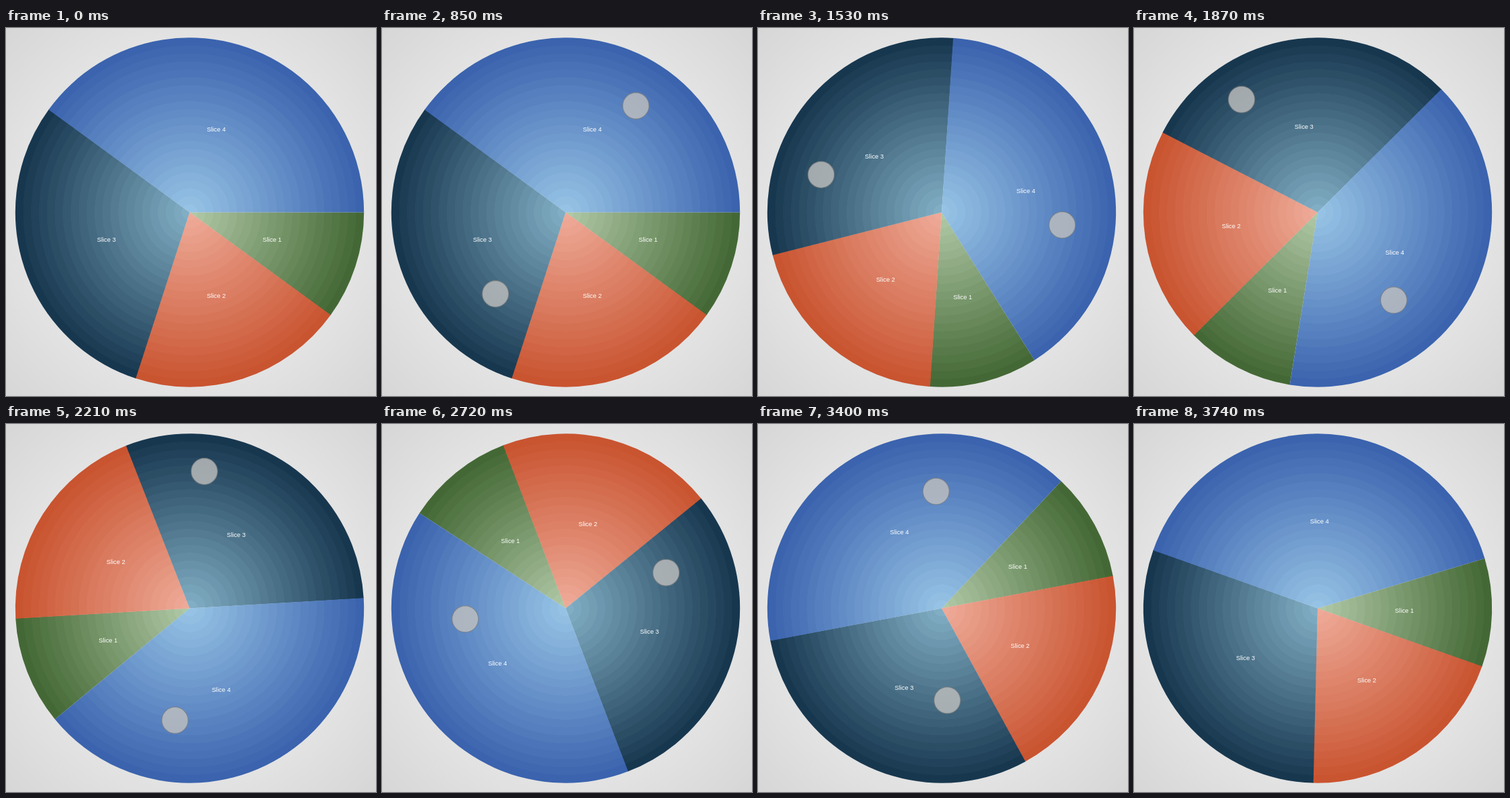
Animation, 548 px wide and 544 px high, one loop 6910 ms. Source, as an HTML page with a canvas:

```html
<!DOCTYPE html>
<html lang="en">
<head>
<meta charset="utf-8">
<title>Rotating pie</title>
<style>
  html, body { margin: 0; width: 100%; height: 100%; overflow: hidden; background: #dcdcdc; }
  canvas { display: block; }
</style>
</head>
<body>
<canvas id="stage" width="548" height="544"></canvas>
<script>
const ctx = document.getElementById('stage').getContext('2d');
const W = 548, H = 544;
const LOOP = 6910, START = 850, STEP = 170, LAST = 17;
const CX = 272, CY = 272.5, R = 258.2;
const BANDS = 22;
const rad = deg => deg * Math.PI / 180;
const mix = (a, b, f) => a + (b - a) * f;

const slices = [
  { share: 0.1, centre: [178, 202, 168], rim: [65, 102, 50] },
  { share: 0.2, centre: [239, 172, 154], rim: [200, 82, 46] },
  { share: 0.3, centre: [132, 177, 199], rim: [20, 52, 76] },
  { share: 0.4, centre: [152, 197, 230], rim: [57, 97, 173] }
];

// Turn of the pie in degrees: [step, angle], straight in between
const turnKeys = [[0, 0], [1, 3], [4, 57.8], [8, 140.6], [11, 213], [13, 256.6], [16, 341.6], [17, 343.4]];

function pieTurn(step) {
  const i = turnKeys.findIndex(key => key[0] >= step);
  if (i <= 0) return 0;
  const [s0, a] = turnKeys[i - 1], [s1, b] = turnKeys[i];
  return mix(a, b, (step - s0) / (s1 - s0));
}

// The two fingers speed up round the middle, spread slowly, then pinch in
const fingerAngle = step => rad(-53.2 + 12.2 * step ** 1.2065);
const fingerReach = step => 173.6 + 2.2 * step - 52 / (1 + Math.exp((9.56 - step) / 0.763));

// Concentric rings of flat colour
function ringFill({ centre, rim }) {
  const g = ctx.createRadialGradient(CX, CY, 0, CX, CY, R);
  for (let i = 0; i < BANDS; i++) {
    const rgb = centre.map((c, k) => Math.round(mix(c, rim[k], (i + 0.5) / BANDS)));
    g.addColorStop(i / BANDS, `rgb(${rgb})`);
    g.addColorStop((i + 1) / BANDS, `rgb(${rgb})`);
  }
  return g;
}

slices.forEach(s => { s.fill = ringFill(s); });
const backdrop = ctx.createRadialGradient(CX, CY, 255, CX, CY, 386);
backdrop.addColorStop(0, '#e3e3e3');
backdrop.addColorStop(1, '#d6d6d6');

function drawPie(turn) {
  let a = turn;
  slices.forEach((s, i) => {
    const end = a + s.share * 360;
    s.mid = rad((a + end) / 2);
    ctx.beginPath();
    ctx.moveTo(CX, CY);
    // A slight overlap hides the seam; the last slice must not cover the first
    ctx.arc(CX, CY, R, rad(a), rad(end + (i < 3 ? 0.15 : 0)));
    ctx.closePath();
    ctx.fillStyle = s.fill;
    ctx.fill();
    a = end;
  });
  ctx.font = '9.3px "Liberation Sans", Arial, sans-serif';
  ctx.textAlign = 'center';
  ctx.fillStyle = '#fff';
  slices.forEach((s, i) => {
    const x = CX + R / 2 * Math.cos(s.mid), y = CY + R / 2 * Math.sin(s.mid);
    ctx.fillText('Slice ' + (i + 1), x - 0.5, y + 3.6);
  });
}

function drawTouch(x, y) {
  ctx.beginPath();
  ctx.arc(x, y, 19.5, 0, Math.PI * 2);
  ctx.fillStyle = 'rgba(193,193,192,0.8)';
  ctx.fill();
  ctx.lineWidth = 1.3;
  ctx.strokeStyle = 'rgba(120,122,124,0.65)';
  ctx.stroke();
}

function draw(t) {
  const step = Math.min(LAST, Math.floor((t - START) / STEP));
  ctx.fillStyle = backdrop;
  ctx.fillRect(0, 0, W, H);
  drawPie(pieTurn(step));
  if (step >= 0 && step < LAST) {
    const a = fingerAngle(step), reach = fingerReach(step);
    const dx = reach * Math.cos(a), dy = reach * Math.sin(a);
    drawTouch(272 + dx, 254 + dy);
    drawTouch(272 - dx, 254 - dy);
  }
}

const begin = performance.now();
function tick() {
  draw((performance.now() - begin) % LOOP);
  requestAnimationFrame(tick);
}
tick();
</script>
</body>
</html>
```
